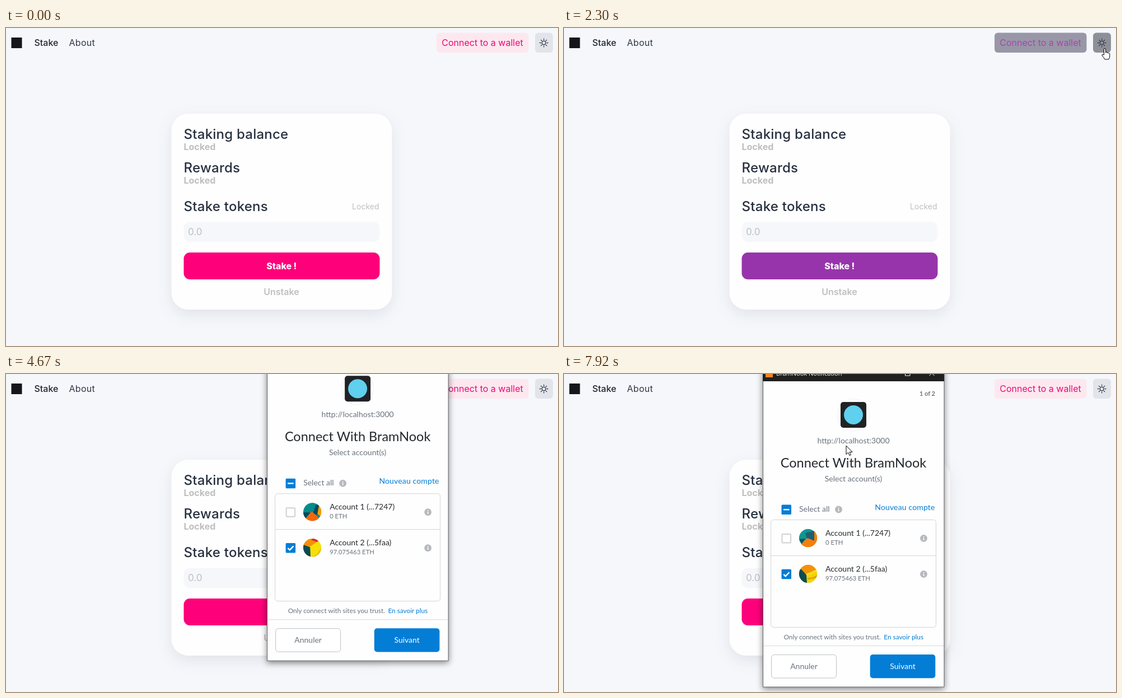
These frames come from a looping animation (986 by 568 pixels, 8000 ms). An HTML page:

```html
<!DOCTYPE html>
<html lang="en">
<head>
<meta charset="utf-8">
<title>Staking demo</title>
<style>
html, body { margin: 0; width: 100%; height: 100%; overflow: hidden; }
svg { display: block; width: 100vw; height: 100vh; }
svg.light { --bg: #f5f7fb; --card: #fefefe; --title: #27303f; --head: #1f2635; --nav: #2d3748; --mute: #bfbfbf; --field: #f5f7fb; --icon: #2d3748; }
svg.dark { --bg: #2d3748; --card: #1d2026; --title: #fff; --head: #fff; --nav: #fff; --mute: #b2b5bd; --field: #2d3748; --icon: #fff; }
text { font-family: Inter, sans-serif; font-size: 16px; white-space: pre; }
.h { font-size: 24px; font-weight: 500; fill: var(--title); letter-spacing: .01em; }
.mute { fill: var(--mute); }
.b { font-weight: 700; }
.card { fill: var(--card); filter: drop-shadow(0 9px 13px rgba(45, 55, 72, .1)); }
#popup text { font-family: Lato, sans-serif; font-size: 14px; fill: #24292e; }
#popup .grey { fill: #6a737d; }
#popup .link { fill: #037dd6; }
#popup .sm { font-size: 11.8px; }
#popup .eth { font-size: 11.3px; fill: #6a737d; }
#popup .cap { font-family: "Open Sans", sans-serif; font-size: 11px; fill: #fff; }
#frame { filter: drop-shadow(0 3px 6px rgba(0, 0, 0, .48)); stroke: #606164; }
.mid { text-anchor: middle; }
.end { text-anchor: end; }
</style>
</head>
<body>
<svg id="stage" class="light" viewBox="0 0 986 568" preserveAspectRatio="none"></svg>
<script>
const LOOP = 8000;
const stage = document.getElementById('stage');
const $ = id => document.getElementById(id);

const text = (x, y, str, cls = '', attrs = '') =>
  `<text x="${x}" y="${y}" class="${cls}" ${attrs}>${str}</text>`;
const rect = (x, y, w, h, r, attrs) =>
  `<rect x="${x}" y="${y}" width="${w}" height="${h}" rx="${r}" ${attrs}/>`;
const path = (d, attrs) => `<path d="${d}" ${attrs}/>`;

const rays = [...Array(8)].map((_, i) => {
  const a = i * Math.PI / 4, c = Math.cos(a), s = Math.sin(a);
  return `M${960.7 + 5.6 * c} ${26.5 + 5.6 * s}l${1.7 * c} ${1.7 * s}`;
}).join('');

const page = `
  <rect width="986" height="568" fill="var(--bg)"/>
  ${rect(9.5, 17, 19, 19, 0, 'fill="#14161c"')}
  ${text(50.5, 32, 'Stake', '', 'font-weight="500" fill="var(--head)"')}
  ${text(112.5, 32, 'About', '', 'fill="var(--nav)" letter-spacing=".3"')}
  ${rect(769, 8.5, 164.5, 35.5, 6, 'id="connect"')}
  ${text(851, 32, 'Connect to a wallet', 'mid', 'id="connectText"')}
  ${rect(945, 8.5, 32, 35.5, 6, 'id="toggle"')}
  <g fill="none" stroke="var(--icon)" stroke-width="1.3" stroke-linecap="round" stroke-linejoin="round">
    <g id="sun"><circle cx="960.7" cy="26.5" r="3.4"/>${path(rays, '')}</g>
    ${path('M966.6 28.6A6.3 6.3 0 1 1 959.3 20.4A5.2 5.2 0 0 0 966.6 28.6Z', 'id="moon"')}
  </g>
  ${rect(295.5, 153, 394, 350, 30, 'class="card"')}
  ${text(317.5, 197.5, 'Staking balance', 'h')}
  ${text(317.5, 218, 'Locked', 'mute b')}
  ${text(317.5, 257.5, 'Rewards', 'h')}
  ${text(317.5, 278, 'Locked', 'mute b')}
  ${text(317.5, 327, 'Stake tokens', 'h')}
  ${text(666.5, 324, 'Locked', 'mute end', 'style="font-size:14px"')}
  ${rect(317.5, 346.5, 350, 35.5, 11, 'fill="var(--field)"')}
  ${text(325, 370, '0.0', 'mute', 'style="font-size:17px"')}
  ${rect(317.5, 401, 350, 48, 11, 'id="stake"')}
  ${text(492.3, 430.5, 'Stake !', 'mid', 'fill="#fff" font-weight="800"')}
  ${text(492, 477, 'Unstake', 'mute mid', 'font-weight="600"')}`;

const info = (x, y) => `<circle cx="${x}" cy="${y}" r="6.4" fill="#b6b9bd"/>
  ${path(`M${x} ${y - 3.4}v1.6M${x} ${y - .6}v4`, 'stroke="#fff" stroke-width="1.7"')}`;
const checkbox = (y, mark) => rect(388.5, y, 17.5, 17.5, 1.5, 'fill="#037dd6"') +
  path(mark, 'fill="none" stroke="#fff" stroke-width="2.4"');

// Each avatar: base colour, then polygons clipped to a disc.
const avatar = (id, y, base, shapes) => `<g id="${id}" transform="translate(436 ${y})" clip-path="url(#disc)">
  <circle r="16.2" fill="${base}"/>${shapes.map(([c, d]) => path(d, `fill="${c}"`)).join('')}</g>`;

const avatars = [
  avatar('a1', 281, '#038c8b', [
    ['#03495e', 'M6-12L12-14 11 6 1 3Z'],
    ['#f99d07', 'M12-12H18V10L9 4Z'],
    ['#f5670a', 'M0 0L16 15V18H-18V4Z'],
    ['#03495e', 'M-17 1L-3 1-14 14Z']]),
  avatar('a2', 345, '#f5e008', [
    ['#f58f06', 'M-18-18H12L6-9-4-2-18-4Z'],
    ['#d92d3a', 'M3-18L13-13 8-10-2-14Z'],
    ['#0b4a56', 'M-18-6L-4-1-3 18H-18Z'],
    ['#f5b800', 'M16 0L14 16-3 17 8 12Z']]),
  avatar('b1', 281, '#129591', [
    ['#1d5f74', 'M-5-9L11-13 12 4-1 5Z'],
    ['#f57f0a', 'M11-13L18-12V18H-18L-13 10-1 0 11 5Z'],
    ['#07505f', 'M-16 2L-5 1-11 10Z']]),
  avatar('b2', 345, '#f3d407', [
    ['#f39209', 'M-18-18H10L16-7-3 2-14-4Z'],
    ['#f5e01c', 'M-4 0Q6-3 15-8L16-5Q7 1-3 3Z'],
    ['#0c4d52', 'M-18-8L-12-8-3 2-2 18H-18Z'],
    ['#e0a406', 'M-1 7Q9 7 16 2L16 6Q8 10-1 10Z']])
].join('');

const account = (y, name, amount) => text(467, y, name) + text(467, y + 16, amount, 'eth') + info(642.5, y + 4.5);

const form = `
  ${text(663, 27, '1 of 2', 'grey end b', 'style="font-size:11px"')}
  <circle cx="517" cy="61" r="29" fill="none" stroke="#f1f2f4"/>
  ${rect(494, 38, 46, 46, 5, 'fill="#202225"')}
  <circle cx="517" cy="61" r="17" fill="#5fd0ee"/>
  ${text(517, 112, 'http://localhost:3000', 'grey mid')}
  ${text(517, 155, 'Connect With BramNook', 'mid', 'style="font-size:23.5px"')}
  ${text(517, 179.5, 'Select account(s)', 'grey mid')}
  ${checkbox(221.5, 'M392 230.2h10.5')}
  ${text(420, 234, 'Select all', 'grey')}${info(490.5, 230)}
  ${text(662.5, 231, 'Nouveau compte', 'link end', 'letter-spacing=".15"')}
  ${rect(370, 249, 294.5, 63, 4, 'id="row1" fill="#f2f3f4"')}
  ${rect(370, 313, 294.5, 64, 0, 'id="row2" fill="#f2f3f4"')}
  ${rect(369.5, 248.5, 295, 192, 5, 'fill="none" stroke="#d2d4d7"')}
  ${path('M370 312.5H664', 'stroke="#d2d4d7"')}
  ${rect(389.5, 274, 15.5, 15.5, 1, 'fill="#fff" stroke="#cfd1d4" stroke-width="2"')}
  ${checkbox(336.8, 'M392.3 345.8l3.4 3.4 6.6-7')}
  ${avatars}
  ${account(277, 'Account 1 (...7247)', '0 ETH')}
  ${account(341, 'Account 2 (...5faa)', '97.075463 ETH')}
  ${text(392.5, 462, 'Only connect with sites you trust.', 'grey sm')}
  ${text(642, 462, 'En savoir plus', 'link end sm')}
  ${path('M356 473.5H678', 'stroke="#d6d9dc"')}
  ${rect(370.5, 489.5, 116, 41.5, 5, 'fill="#fff" stroke="#bbc0c5"')}
  ${text(428.5, 515, 'Annuler', 'grey mid')}
  ${rect(546.7, 489, 116.6, 42.3, 5, 'id="next"')}
  ${text(605, 515, 'Suivant', 'mid', 'style="fill:#fff"')}`;

const loader = `
  <circle cx="518" cy="226" r="68" fill="#f5841f"/>
  <circle id="spin" cx="517" cy="332" r="10.8" fill="none" stroke="#f7902f" stroke-width="2.8" stroke-dasharray="54 14"/>`;

const titleBar = `
  ${rect(355, -31, 324, 32, 0, 'fill="#202020"')}
  ${rect(360, -19, 13, 13, 0, 'fill="#f5841f"')}
  ${text(379, -9, 'BramNook Notification', 'cap')}
  ${path('M609.5-17.5h8.5v8.5h-8.5ZM652.5-18l9 9m0-9l-9 9', 'fill="none" stroke="#fff"')}`;

stage.innerHTML = `
  <defs><clipPath id="disc"><circle r="16.2"/></clipPath></defs>
  ${page}
  <g id="popup">
    ${rect(355.5, -30.5, 323.5, 577.5, 0, 'id="frame"')}
    <g id="loader">${loader}</g>
    <g id="form">${form}</g>
    <g id="bar">${titleBar}</g>
  </g>
  <g id="cursor" fill="#fff" stroke="#000" stroke-linejoin="round">
    ${path('M0 0V15.5L3.6 12.2 6 17.6 8.4 16.5 6.1 11.4H11Z', 'id="arrow"')}
    ${path('M-1.5 12V2Q-1.5.5 0 .5T1.5 2V8Q2 6.8 3.2 7.2T4.4 8.5Q5.5 7.5 6.6 8.8 8 8.4 8.8 10V14Q8.8 17 7 20H0Q-1 17.5-5 13-5.5 10.5-3 11.5Z', 'id="hand"')}
  </g>`;

// [time, x, y]
const pointer = [
  [330, 864, 572], [1080, 970, 36], [1200, 971, 33], [1400, 971, 33], [1980, 967, 40],
  [2060, 966, 36], [2320, 966, 36], [2940, 854, 28], [3560, 854, 28], [3800, 850, -30],
  [5230, 560, -20], [5650, 560, -8], [6030, 562, 35], [6870, 600, 500], [6960, 601, 508],
  [7430, 606, 514], [7680, 606, 514], [7920, 504, 128]
];
const windowPath = [[4400, 668, -83], [4850, 358, -9], [5070, 355, 0], [5230, 355, 0], [5650, 355, 12]];

const clamp = v => Math.min(1, Math.max(0, v));
const smooth = v => v * v * (3 - 2 * v);

function along(keys, t) {
  let i = keys.findIndex(k => k[0] > t);
  if (i < 0) i = keys.length;
  const a = keys[Math.max(0, i - 1)], b = keys[Math.min(i, keys.length - 1)];
  const f = a === b ? 0 : smooth((t - a[0]) / (b[0] - a[0]));
  return [1, 2].map(k => a[k] + (b[k] - a[k]) * f);
}

const channels = hex => [1, 3, 5].map(i => parseInt(hex.slice(i, i + 2), 16));
function mix(from, to, f) {
  const b = channels(to);
  return `rgb(${channels(from).map((v, i) => Math.round(v + (b[i] - v) * f))})`;
}

const show = (id, on) => $(id).style.display = on ? '' : 'none';
const fill = (id, color) => $(id).style.fill = color;

function draw(t) {
  const [cx, cy] = along(pointer, t);
  const [wx, wy] = along(windowPath, t);
  const over = (x, y, w, h) => cx >= x && cx <= x + w && cy >= y && cy <= y + h;
  const open = t >= 3420;
  const formOn = t >= 4430;

  // Page theme: surfaces switch at once, accents fade.
  const dark = t >= 1360 && t < 2220;
  const fade = clamp((t - 1360) / 150) - clamp((t - 2220) / 150);
  const onConnect = !open && over(769, 8, 164, 36);
  const onToggle = !open && over(945, 8, 32, 36);
  stage.setAttribute('class', dark ? 'dark' : 'light');
  show('sun', !dark);
  show('moon', dark);
  fill('stake', mix('#fd007a', '#2172e5', fade));
  fill('connect', mix(onConnect ? '#fbd8e5' : '#fde8ef', '#233852', fade));
  fill('connectText', mix('#ee0778', '#5090ea', fade));
  fill('toggle', mix(onToggle ? '#a8abb4' : '#e2e4ea', '#70707a', fade));

  // Wallet window
  show('popup', open);
  const grow = clamp((t - 3420) / 160);
  const scale = .976 + .024 * grow;
  $('popup').setAttribute('transform',
    `translate(${wx - 355} ${wy}) translate(517 273) scale(${scale}) translate(-517 -273)`);
  $('popup').style.opacity = clamp(.6 + .69 * grow);
  fill('frame', t < 3660 ? '#505154' : '#fefefe');
  show('loader', t >= 3860 && !formOn);
  show('form', formOn);
  show('bar', t >= 3580);
  $('spin').setAttribute('transform', `rotate(${(t - 4350) * .36 - 52} 517 332)`);

  const onNext = formOn && over(547, wy + 489, 116, 42);
  const onRow1 = formOn && over(370, wy + 249, 294, 63);
  const onRow2 = formOn && over(370, wy + 313, 294, 64);
  show('row1', onRow1);
  show('row2', onRow2);
  fill('next', onNext ? '#0260a4' : '#037dd6');
  const late = t >= 6300;
  ['a1', 'a2'].forEach(id => show(id, !late));
  ['b1', 'b2'].forEach(id => show(id, late));

  const hand = onConnect || onToggle || onNext || onRow1 || onRow2;
  show('hand', hand);
  show('arrow', !hand);
  show('cursor', t >= 330);
  $('cursor').setAttribute('transform', `translate(${cx} ${cy})`);
}

function tick() {
  draw(performance.now() % LOOP);
  requestAnimationFrame(tick);
}
tick();
</script>
</body>
</html>
```
